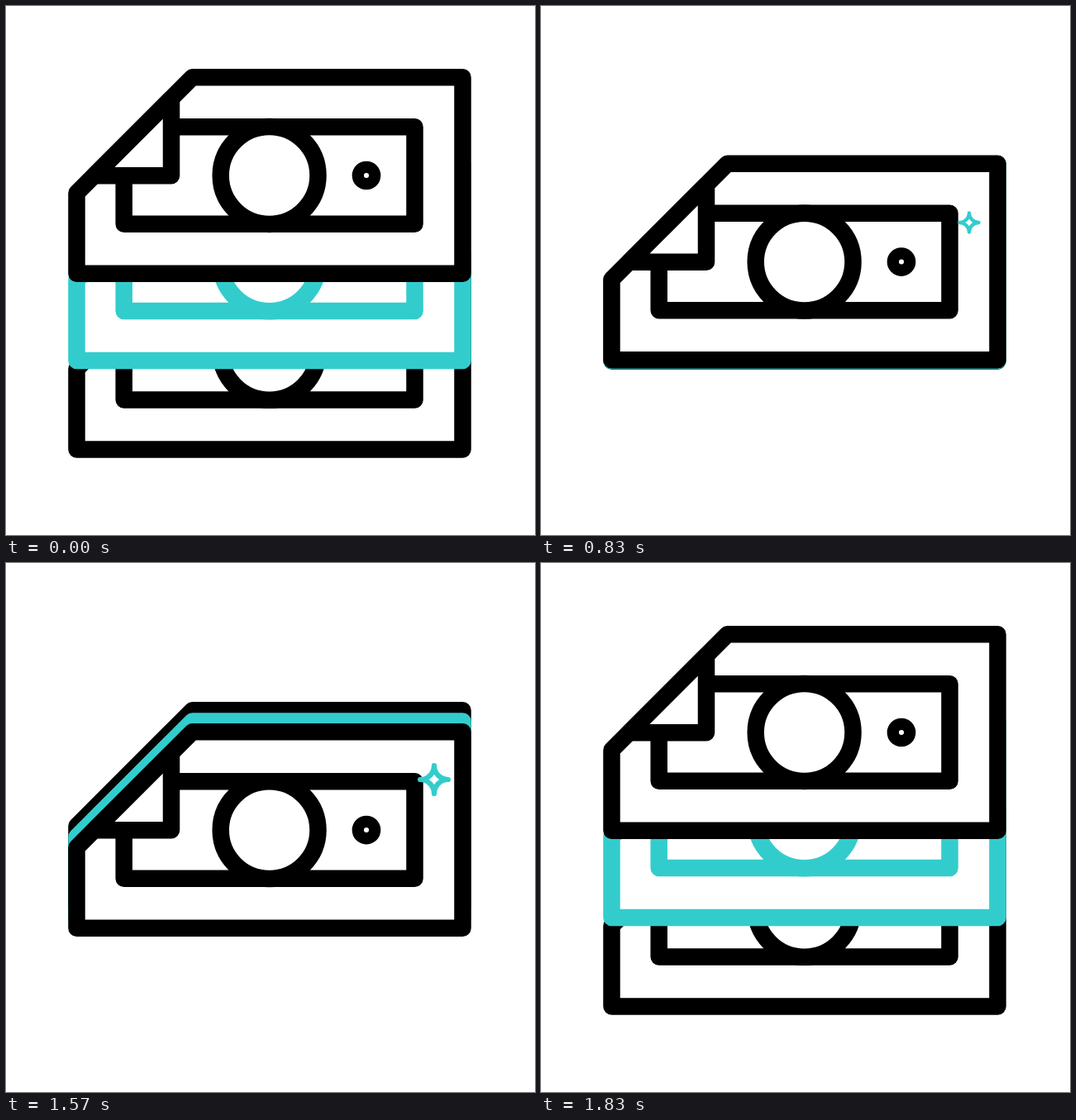
Write an HTML page that moves like this. It is 640 px wide and 640 px high and loops after 2500 ms.

```html
<!DOCTYPE html>
<html lang="en">
<head>
<meta charset="utf-8">
<title>Banknotes</title>
<style>
  html, body { margin: 0; width: 100%; height: 100%; overflow: hidden; background: #fff; }
  svg { display: block; width: 100%; height: 100%; }
</style>
</head>
<body>
<svg viewBox="0 0 640 640">
  <defs>
    <g id="note" fill="#fff" stroke="currentColor" stroke-width="20.5" stroke-linejoin="round" stroke-linecap="round">
      <path d="M225.5 86.2H552.5V323.7H85.5V226.2Z"/>
      <path d="M200 146.2H494.5V263.7H142.7V205.3" fill="none"/>
      <circle cx="318.6" cy="205" r="58.9"/>
      <circle cx="436" cy="205" r="10.2" stroke-width="14.3"/>
      <path d="M200 112V205.3H106.7Z"/>
    </g>
  </defs>
  <use id="bottom" href="#note" color="#000"/>
  <use href="#note" color="#33cccc" y="105.3"/>
  <use id="top" href="#note" color="#000"/>
  <path id="spark" d="M0-45A45 45 0 0 0 45 0A45 45 0 0 0 0 45A45 45 0 0 0-45 0A45 45 0 0 0 0-45Z"
    fill="#fff" stroke="#33cccc" stroke-width="16.4" stroke-linejoin="round"/>
</svg>
<script>
  const LOOP = 2500, STEP = 100 / 3;
  const [top_, bottom, spark] = ['top', 'bottom', 'spark'].map(id => document.getElementById(id));

  function ease(k, start, length) {
    const x = Math.min(1, Math.max(0, (k - start) / length));
    return x * x * (3 - 2 * x);
  }

  function render(ms) {
    // The motion runs in steps of a thirtieth of a second.
    const k = Math.floor((ms % LOOP + 5) / STEP);
    const closed = ease(k, 17.25, 11.9) - ease(k, 44, 10.85);
    const size = ease(k, 23, 6) - ease(k, 43.5, 6);
    top_.setAttribute('transform', `translate(0 ${145.2 * closed})`);
    bottom.setAttribute('transform', `translate(0 ${212.8 - 148.5 * closed})`);
    spark.setAttribute('transform', `translate(518 262) scale(${size})`);
    spark.style.display = size > 0 ? '' : 'none';
  }

  const begin = performance.now();
  function tick() {
    render(performance.now() - begin);
    requestAnimationFrame(tick);
  }
  tick();
</script>
</body>
</html>
```
